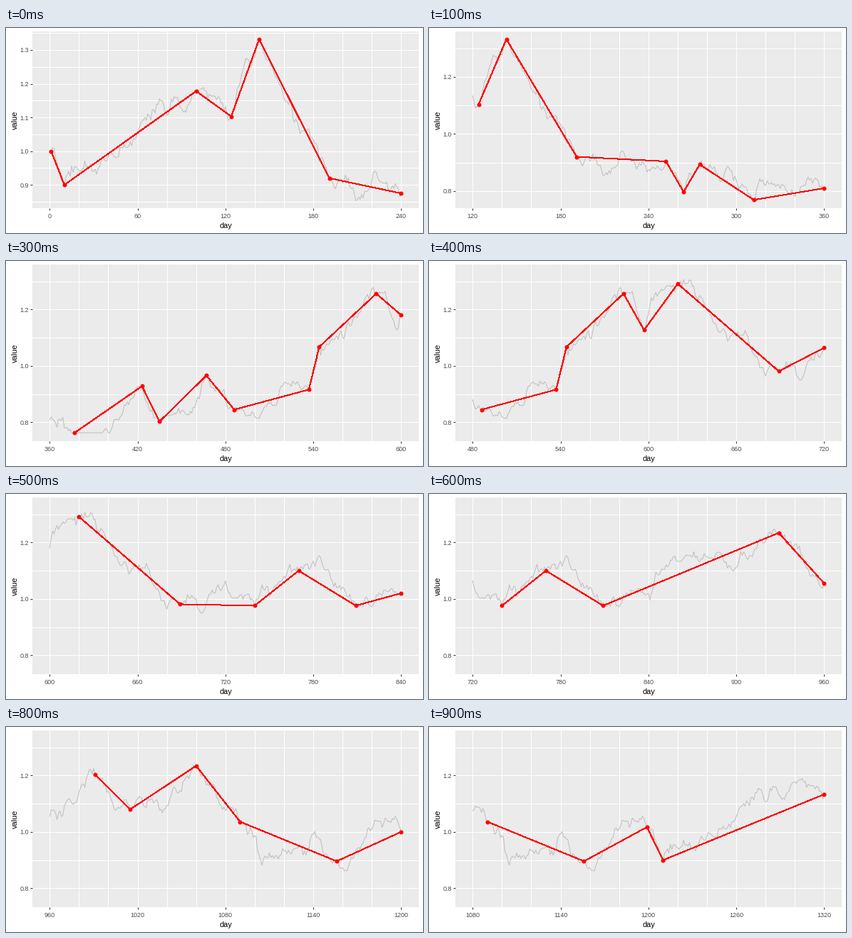
Recreate the animation shown at these times as a matplotlib script. Size 585 by 289 pixels, loop 1000 ms.

```python
import matplotlib.pyplot as plt
import numpy as np
from matplotlib.animation import FuncAnimation

WIDTH, HEIGHT, DPI = 585, 289, 64
PX = 72 / DPI  # points per pixel
LEFT, TOP, RIGHT, BOTTOM = 36.65, 5, 579, 254
SPAN, STEP, CYCLE = 240, 120, 1200
FRAMES, INTERVAL = 10, 100
HIGH = 1.332
LOWS = .856, .7695, .763  # the value range widens, then settles
MIN_LEG = 5  # days a turn needs around it to be confirmed

# Turning points of the trend: (day, value).
TURNS = [
    (1, 1.0), (10, .90), (100, 1.178), (124, 1.103), (143, 1.332),
    (191, .92), (252, .904), (264, .797), (275, .893), (312, .769),
    (316, .843), (377, .763), (423, .928), (435, .803), (467, .966),
    (486, .845), (537, .916), (544, 1.067), (583, 1.256), (597, 1.127),
    (620, 1.291), (689, .981), (740, .976), (770, 1.1), (809, .976),
    (929, 1.234), (991, 1.203), (1015, 1.08), (1060, 1.234),
    (1090, 1.036), (1156, .896), (1199, 1.017), (1210, .90),
]
# Value at each window border, one every STEP days.
BORDERS = [1.0, 1.133, .875, .81, .88, 1.18, 1.064, 1.02, 1.055, 1.075, 1.0]


def daily_series():
    """Seeded random walk pinned to the turns and window borders."""
    pins = [(i * STEP, v) for i, v in enumerate(BORDERS)]
    pins += [p for p in TURNS if p[0] < CYCLE]
    pin_days, pin_values = np.array(sorted(pins)).T
    days = np.arange(CYCLE + 1)
    walk = np.random.default_rng(4).normal(0, .012, days.size).cumsum()
    walk -= np.interp(days, pin_days, walk[pin_days.astype(int)])
    return np.clip(np.interp(days, pin_days, pin_values) + walk, LOWS[-1], HIGH)


def trend_points(start, end):
    """Confirmed turns inside the window, closed by its last day."""
    points = [p for p in TURNS if start <= p[0] < end]
    before, last = points[-2][0], points[-1][0]
    if min(last - before, end - last) < MIN_LEG:
        points.pop()
    return points + [(end, SERIES[end % CYCLE])]


SERIES = daily_series()

plt.rcParams["font.family"] = "Liberation Sans"
fig = plt.figure(figsize=(WIDTH / DPI, HEIGHT / DPI), dpi=DPI, facecolor="white")
ax = fig.add_axes([LEFT / WIDTH, 1 - BOTTOM / HEIGHT,
                   (RIGHT - LEFT) / WIDTH, (BOTTOM - TOP) / HEIGHT],
                  facecolor="#EBEBEB")
ax.spines[:].set_visible(False)
ax.set_axisbelow(True)
ax.grid(True, which="both", color="white", linewidth=PX)
ax.tick_params(which="major", length=3 * PX, width=PX, color="#333333",
               labelcolor="#4D4D4D", labelsize=9 * PX)
ax.tick_params(axis="x", pad=4 * PX)
ax.tick_params(axis="y", pad=2 * PX)
ax.tick_params(which="minor", length=0)

title = dict(fontsize=11 * PX, color="black", ha="center")
fig.text(308 / WIDTH, 1 - 281.5 / HEIGHT, "day", va="baseline", **title)
fig.text(12.7 / WIDTH, 1 - 129.5 / HEIGHT, "value", va="center", rotation=90, **title)

daily, = ax.plot([], [], color="#BEBEBE", linewidth=PX)
# Without antialiasing the stroke gains about one pixel.
trend, = ax.plot([], [], color="red", linewidth=PX, antialiased=False,
                 marker="o", markersize=6 * PX, markeredgewidth=0)


def draw(frame):
    start = frame * STEP
    end = start + SPAN
    days = np.arange(max(start, 1), end + 1)
    daily.set_data(days, SERIES[days % CYCLE])
    trend.set_data(*zip(*trend_points(start, end)))

    step = .1 if frame == 0 else .2
    major_x = np.arange(start, end + 1, 60)
    major_y = np.arange(.6, 1.5, step)
    ax.set_xticks(major_x, [str(x) for x in major_x])
    ax.set_xticks(np.arange(start, end + 1, 20), minor=True)
    ax.set_yticks(major_y, [f"{y:.1f}" for y in major_y])
    ax.set_yticks(np.arange(.6, 1.5, step / 2), minor=True)

    # Five percent margins; vertically the plot sits half a pixel high.
    low = LOWS[min(frame, 2)]
    extent = HIGH - low
    ax.set_xlim(start - .05 * SPAN, end + .05 * SPAN)
    ax.set_ylim(low - .0524 * extent, HIGH + .0476 * extent)
    return daily, trend


anim = FuncAnimation(fig, draw, frames=FRAMES, interval=INTERVAL,
                     init_func=lambda: draw(0), repeat=True, repeat_delay=0)
plt.show()
```
